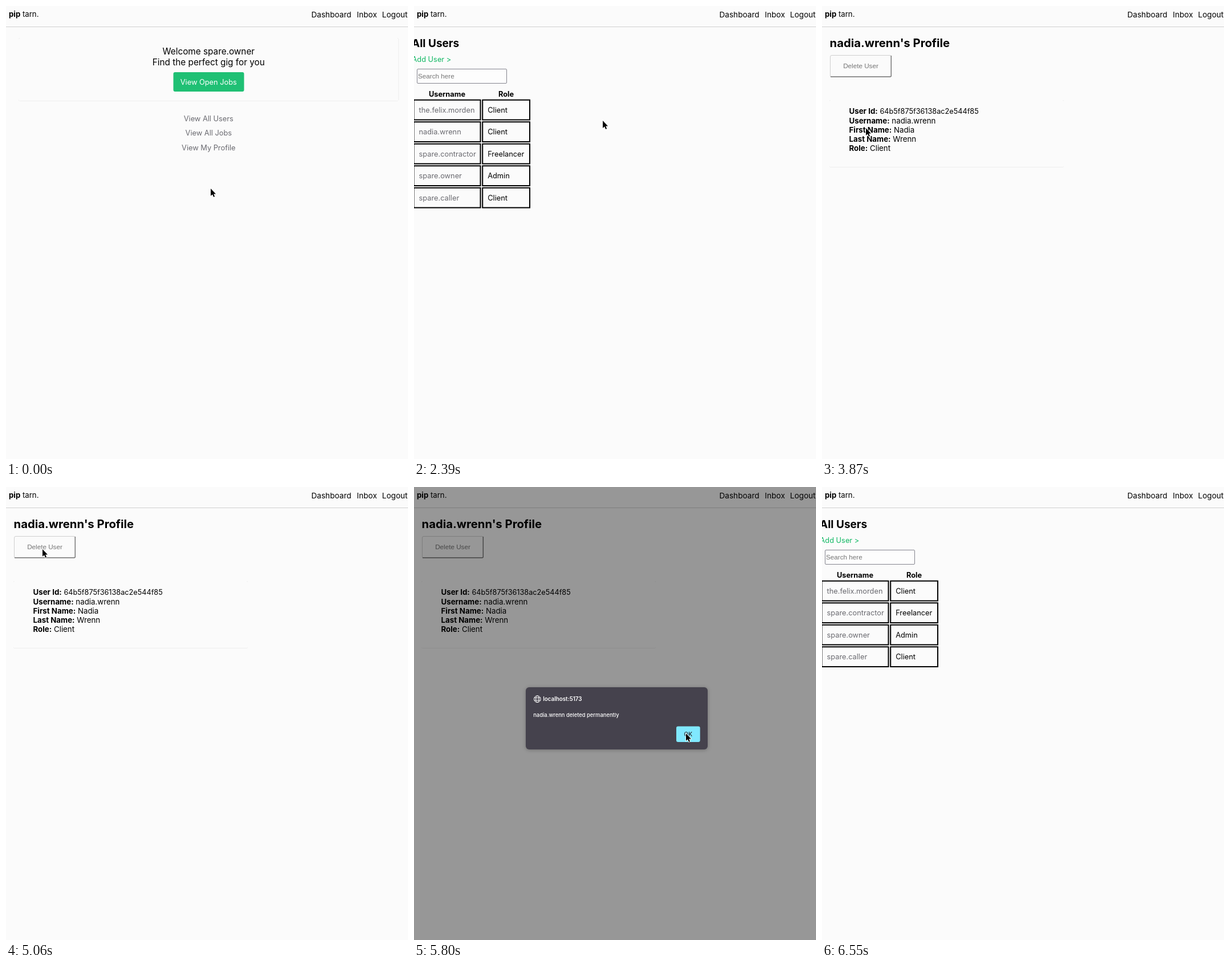
These frames come from a looping animation (705x794 px, 8070 ms). An HTML page:

```html
<!DOCTYPE html>
<html lang="en">
<head>
<meta charset="utf-8">
<title>Job board</title>
<style>
  html, body { margin: 0; width: 100%; height: 100%; overflow: hidden; background: #fbfbfb; }
  svg { display: block; width: 705px; height: 794px; font: 12.8px Inter, sans-serif; }
  .mid { text-anchor: middle; }
  .bold { font-weight: 700; }
  .nav { font-size: 13.6px; }
  .lead { font-size: 15.3px; }
  .link { fill: #6a6a70; }
  .field { font: 11.7px "Liberation Sans", Arial, sans-serif; fill: #757575; }
  .card { fill: #fbfbfb; filter: drop-shadow(0 .8px .5px rgba(0, 0, 0, .2)); }
  .cell { fill: none; stroke: #000; stroke-width: 2; }
  .info { font-size: 13.3px; }
  .id { font-size: 12.7px; }
  .alert { font-size: 9.4px; font-weight: 500; fill: #fff; }
  .box { fill: #45424d; filter: drop-shadow(0 1px 3px rgba(0, 0, 0, .25)); }
  .globe { fill: none; stroke: #fff; stroke-width: 1; }
  #arrow { fill: #000; stroke: #fff; stroke-width: 1.6px; paint-order: stroke; }
  #hand { fill: #fff; stroke: #000; stroke-linejoin: round; }
</style>
</head>
<body>
<svg viewBox="0 0 705 794">
  <rect width="705" height="794" fill="#fbfbfb"/>
  <g class="nav">
    <text x="5" y="19.3" font-size="13.2"><tspan class="bold">pip</tspan> tarn.</text>
    <text x="535.5" y="19.5">Dashboard</text>
    <text x="615.3" y="19.5">Inbox</text>
    <text x="659.5" y="19.5">Logout</text>
  </g>
  <rect y="36" width="705" height="1" fill="#d0d0d0"/>

  <g id="home" class="mid">
    <rect class="card" x="22" y="56" width="666.5" height="110.5" rx="3"/>
    <text class="lead" x="355.3" y="85">Welcome spare.owner</text>
    <text class="lead" x="355.3" y="104">Find the perfect gig for you</text>
    <rect x="293.5" y="116" width="124" height="34" rx="3" fill="#1fc074"/>
    <text x="355.3" y="137.7" fill="#fff">View Open Jobs</text>
    <g class="link">
      <text x="355.3" y="201.5">View All Users</text>
      <text x="355.3" y="227">View All Jobs</text>
      <text x="355.3" y="252.7">View My Profile</text>
    </g>
  </g>

  <g id="users">
    <text class="bold" x="-4" y="72" font-size="19">All Users</text>
    <text x="-3.5" y="98" fill="#10b863">Add User &gt;</text>
    <rect x="5.5" y="110.5" width="157" height="25" rx="1.5" fill="#fdfdfd" stroke="#84848e"/>
    <text class="field" x="7" y="127">Search here</text>
    <text class="bold mid" x="58" y="158.5">Username</text>
    <text class="bold mid" x="161.5" y="158.5">Role</text>
    <g id="rows"></g>
  </g>

  <g id="profile">
    <text class="bold" x="13.5" y="72" font-size="20.3">nadia.wrenn's Profile</text>
    <rect x="14.5" y="86.5" width="107" height="38" rx="2.5" fill="#fbfbfb" stroke="#cfcfcf"/>
    <path d="M15 124H119.3Q121.3 124 121.3 122V87" fill="none" stroke="#777" stroke-width="1.5"/>
    <text class="field mid" x="68" y="109.3">Delete User</text>
    <rect class="card" x="13" y="165" width="411" height="117.5" rx="2"/>
    <g id="info" class="info"></g>
  </g>

  <g id="dialog" class="alert">
    <rect width="705" height="794" fill="#000" opacity=".4"/>
    <rect class="box" x="196" y="351" width="319" height="109" rx="6"/>
    <g class="globe">
      <circle cx="216.3" cy="371.7" r="5.8"/>
      <ellipse cx="216.3" cy="371.7" rx="2.7" ry="5.8"/>
      <path d="M211 369.6H221.6M211 373.8H221.6"/>
    </g>
    <text x="226.2" y="375.2" font-size="9.8" font-weight="600">localhost:5173</text>
    <text x="209.2" y="403.4">nadia.wrenn deleted permanently</text>
    <rect x="460" y="419.5" width="41.7" height="27.5" rx="3" fill="#80e8ff"/>
    <text class="mid" x="480.8" y="437" font-size="10" fill="#25242c">OK</text>
  </g>

  <g id="cursor">
    <path id="arrow" d="M0 0V12.8L3 10.2 5.1 14.8 7.1 13.9 5.1 9.4H9Z"/>
    <path id="hand" d="M4 8.6V1.7C4 .3 6 .3 6 1.7V6 5.6C6 4.5 8 4.6 8 5.8V6.6 6C8 5 10 5.1 10 6.3V7.2 6.8C10 5.9 12 6 12 7.2V10C12 12 11 12.5 11 14.5H5C5 13 2.5 11 1 8.8 .2 7.5 2 6.5 4 8.6Z"/>
  </g>
</svg>
<script>
const LOOP = 8070;
const $ = id => document.getElementById(id);

const users = [
  ["the.felix.morden", "Client"],
  ["nadia.wrenn", "Client"],
  ["spare.contractor", "Freelancer"],
  ["spare.owner", "Admin"],
  ["spare.caller", "Client"],
];
const remaining = users.filter(([name]) => name !== "nadia.wrenn");

const tableRows = list => list.map(([name, role], i) => `
  <g transform="translate(0 ${i * 38.5})">
    <rect class="cell" x="-.5" y="164.7" width="117" height="34.8"/>
    <rect class="cell" x="120.2" y="164.7" width="82.8" height="34.8"/>
    <text class="link" x="8.5" y="186.8">${name}</text>
    <text x="129.2" y="186.8">${role}</text>
  </g>`).join("");

$("info").innerHTML = [
  ["User Id", "64b5f875f36138ac2e544f85", "id"],
  ["Username", "nadia.wrenn"],
  ["First Name", "Nadia"],
  ["Last Name", "Wrenn"],
  ["Role", "Client"],
].map(([label, value, style = ""], i) =>
  `<text x="47.5" y="${189.3 + i * 16.25}"><tspan class="bold">${label}:</tspan> <tspan class="${style}">${value}</tspan></text>`
).join("");

// Cursor moves: start ms, ms per step, steps, end x, end y, easing
const smooth = p => p * p * (3 - 2 * p);
const speedUp = p => p ** 3;
const moves = [
  [150, 150, 3, 359, 232, smooth],
  [600, 150, 1, 357, 250, smooth],
  [1040, 150, 3, 351, 202, smooth],
  [2390, 150, 6, 82, 190, smooth],
  [3280, 150, 2, 77, 214, smooth],
  [4170, 148, 7, 64, 109, smooth],
  [5350, 150, 4, 477, 432, smooth],
  [6250, 150, 2, 628, 674, speedUp],
];

function cursorAt(t) {
  let x = 359, y = 320;
  for (const [start, step, count, toX, toY, ease] of moves) {
    if (t < start) break;
    const p = ease(Math.min(count, Math.floor((t - start) / step) + 1) / count);
    x += (toX - x) * p;
    y += (toY - y) * p;
  }
  return [x, y];
}

const show = (id, on) => { $(id).style.display = on ? "" : "none"; };
let shown;

function draw(now) {
  const t = now % LOOP;
  const within = (from, to) => t >= from && t < to;

  show("home", t < 2390);
  show("users", within(2390, 3730) || t >= 6250);
  show("profile", within(3730, 6250));
  show("dialog", within(5210, 6100));

  const list = t >= 6250 ? remaining : users;
  if (list !== shown) $("rows").innerHTML = tableRows(shown = list);

  const hand = within(600, 2390) || within(3430, 3870);
  show("hand", hand);
  show("arrow", !hand);
  show("cursor", t < 6550);
  const press = within(1940, 2090) ? 0.5 : 0;
  const [x, y] = cursorAt(t);
  $("cursor").setAttribute("transform", `translate(${x - press} ${y - press})`);
}

const begin = performance.now();
function tick() {
  draw(performance.now() - begin);
  requestAnimationFrame(tick);
}
tick();
</script>
</body>
</html>
```
